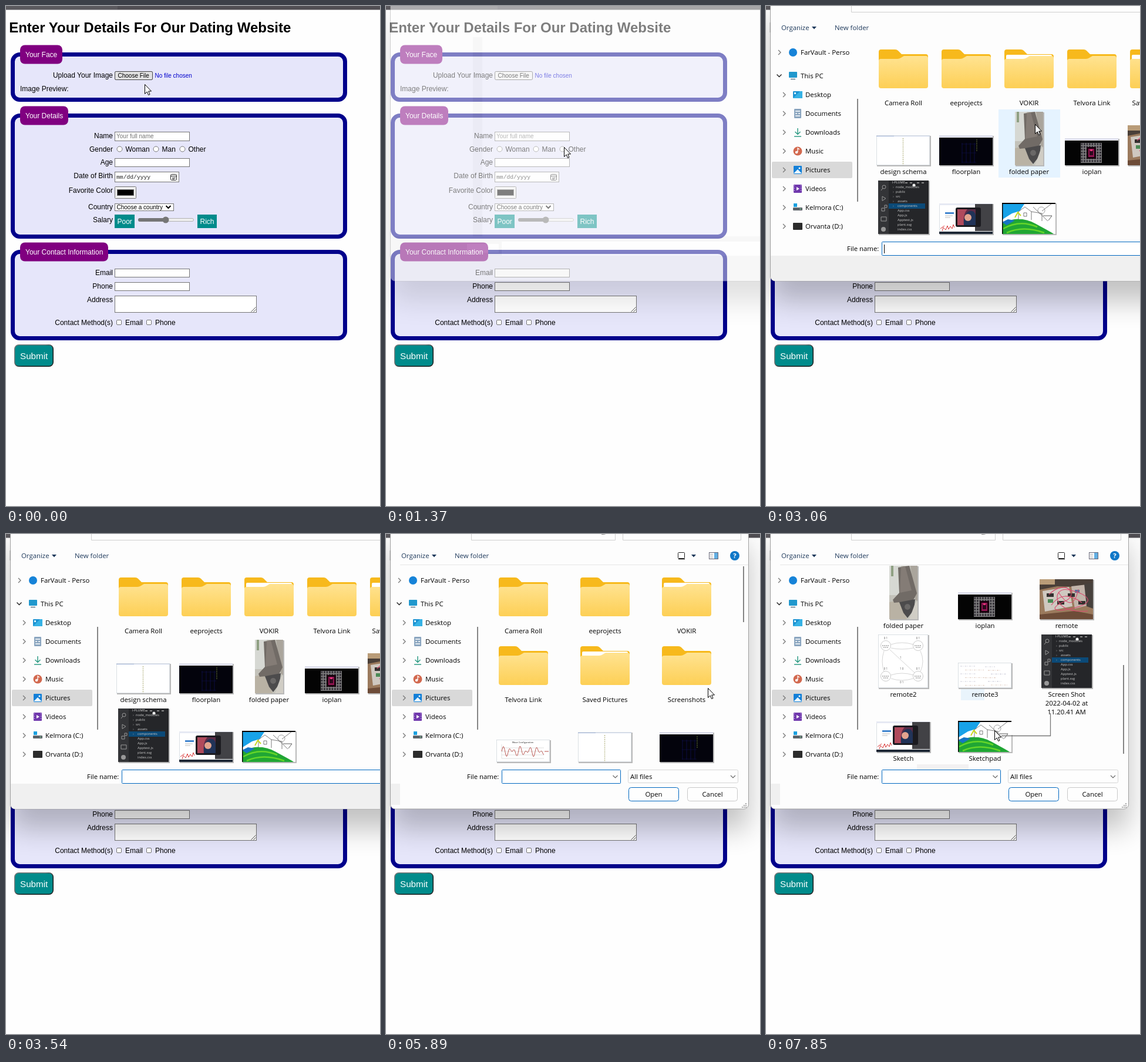
Animation of 637 by 851 pixels, one loop 7.99 s. Source, as an HTML page:

```html
<!DOCTYPE html>
<html lang="en">
<head>
<meta charset="utf-8">
<title>Form and file picker</title>
<style>
html, body { margin: 0; width: 100%; height: 100%; overflow: hidden; background: #fefefe; }
svg { display: block; }
text { font-family: "Liberation Sans", Arial, sans-serif; white-space: pre; }
.ui text { font-family: "Open Sans", "Noto Sans", sans-serif; }
.mono { font-family: "Liberation Mono", monospace !important; }
</style>
</head>
<body>
<svg id="stage" width="637" height="851" viewBox="0 0 637 851"></svg>
<script>
const LOOP = 7990;
const NAVY = '#00008b', TEAL = '#008b8b', GREY = '#767676', BLUE = '#0067c0';

// Drawing helpers
const rect = (x, y, w, h, fill, extra = '') =>
  `<rect x="${x}" y="${y}" width="${w}" height="${h}" fill="${fill}" ${extra}/>`;
const box = (x, y, w, h, fill, stroke = GREY, r = 0) =>
  rect(x + .5, y + .5, w - 1, h - 1, fill, `stroke="${stroke}" rx="${r}"`);
const text = (x, y, s, size = 12, fill = '#000', extra = '') =>
  `<text x="${x}" y="${y}" font-size="${size}" fill="${fill}" ${extra}>${s}</text>`;
const ui = (x, y, s, extra = '', fill = '#000') => text(x, y, s, 11.4, fill, extra);
const fill = (d, color, extra = '') => `<path d="${d}" fill="${color}" ${extra}/>`;
const line = (d, color, w = 1, extra = '') =>
  `<path d="${d}" fill="none" stroke="${color}" stroke-width="${w}" ${extra}/>`;
const circle = (x, y, r, color, stroke = 'none', w = 1) =>
  `<circle cx="${x}" cy="${y}" r="${r}" fill="${color}" stroke="${stroke}" stroke-width="${w}"/>`;
const group = (id, body, extra = '') => `<g id="${id}" ${extra}>${body}</g>`;
const repeat = (n, f) => Array.from({ length: n }, (_, i) => f(i)).join('');
const END = 'text-anchor="end"', MID = 'text-anchor="middle"';

// Web form
const section = (y, h, title, w) =>
  rect(11.5, y + 3.5, 566, h - 7, '#e6e6fa', `stroke="${NAVY}" stroke-width="7" rx="12"`) +
  rect(24, y - 12.5, w, 32, '#800080', 'rx="8"') + text(33, y + 7.5, title, 12, '#fff');
const label = (y, s) => text(182, y, s, 12, '#000', END);
const input = (y, h = 16, w = 128) => box(185, y, w, h, '#fff');
const radio = (x, s) => circle(x, 243.5, 4.5, '#fff', GREY) + text(x + 10, 248, s);
const check = (x, s) => box(x, 534, 9, 9, '#fff', GREY, 1.5) + text(x + 15, 543, s);
const tag = (x, w, s) => rect(x, 355, w, 23, TEAL) + text(x + 4.5, 371, s, 12, '#fff');

const form = [
  rect(0, 0, 637, 851, '#fefefe'),
  rect(0, 0, 637, 6, '#504e53'), rect(0, 0, 190, 6, '#5b595e'), rect(0, 6, 637, 1, '#a8a7aa'),
  text(5.2, 45, 'Enter Your Details For Our Dating Website', 24, '#000', 'font-weight="bold"'),
  section(79, 84, 'Your Face', 72),
  label(122, 'Upload Your Image'),
  box(185, 111, 65, 15, '#efefef', '#555', 2),
  text(190.5, 122, 'Choose File', 10), text(253.5, 122, 'No file chosen', 10, '#0000cd'),
  text(24, 145, 'Image Preview:'),
  section(183, 213, 'Your Details', 82),
  label(225, 'Name'), input(214), text(188, 225, 'Your full name', 10, '#757575'),
  label(248, 'Gender'), radio(193.5, 'Woman'), radio(255.5, 'Man'), radio(300.5, 'Other'),
  label(270, 'Age'), input(259, 15),
  label(293, 'Date of Birth'), input(282, 18, 110),
  text(188, 294, 'mm/dd/yyyy', 9.7, '#222', 'class="mono"'),
  box(280, 286, 11, 11, '#fff', '#222', 2), line('M280 289.5h11M283 292.5h6M283 294.5h4', '#222'),
  label(318, 'Favorite Color'), box(185, 307, 37, 21, '#efefef', GREY, 1), box(189, 312, 29, 11, '#000'),
  label(346, 'Country'), input(336, 13, 101), text(188.5, 346, 'Choose a country', 10),
  line('M272.500 340l4 4 4-4', '#000', 2),
  label(368, 'Salary'), tag(185, 34, 'Poor'), tag(326, 33, 'Rich'),
  rect(225.5, 361.5, 94, 5, '#efefef', 'stroke="#b2b2b2" rx="2.5"'),
  rect(225, 361, 47, 6, GREY, 'rx="3"'), circle(272, 364, 5.5, GREY),
  section(415, 154, 'Your Contact Information', 150),
  label(458, 'Email'), input(447, 15), label(481, 'Phone'), input(470, 15),
  label(504, 'Address'), input(493, 29, 242), line('M417.500 520.500l8-8M421.500 520.500l4-4', '#555'),
  label(543, 'Contact Method(s)'), check(188, 'Email'), check(239, 'Phone'),
  rect(14.75, 576.75, 65.5, 36.5, TEAL, 'stroke="url(#edge)" stroke-width="1.500" rx="7"'),
  text(24, 601, 'Submit', 15.2, '#fff')
].join('');

// Thumbnails, each drawn from its own top left corner
const folder = papers =>
  fill('M0 4q0-4 4-4h24q3 0 5 2l6 6h41q4 0 4 4v20H0Z', '#f7b91c') +
  (papers ? rect(3, 9, 78, 10, '#fff', 'rx="2"') : '') +
  fill('M0 19q0-3 4-3h28q3 0 6-2l5-3h37q4 0 4 4v47q0 4-4 4H4q-4 0-4-4Z', 'url(#gold)');
const sheet = (w, h, color = '#fff') => rect(0, 0, w, h, color, 'stroke="#cfd6dc" stroke-width="1.500"');
const caption = w => rect(0, 0, w, 4, '#f4f4f8') + rect(0, 1, w, 1, '#b9bdd8');

const art = {
  schema: sheet(91, 51) + line('M0 1.500h91', '#ccd6ea') + line('M0 1.500h30', '#9fb2d8') +
    line('M45.500 5v46', '#c2c29a', 1.6, 'stroke-dasharray="2 1.500"'),
  floor: rect(0, 0, 91, 51, '#03030c') + caption(91) + repeat(4, i => line(`M${39 + 7 * i} 13v34`, '#111150', .8)) +
    line('M38 15h25M38 30h25M38 46h25', '#0e0e40', .7) + line('M64 7v20', '#6c7c34', 1, 'stroke-dasharray="2 1"'),
  paper: rect(0, 0, 48, 91, '#c3c2ba') + rect(0, 0, 20, 50, '#d6d8d3') + rect(3, 0, 4, 18, '#8fa083') +
    fill('M0 62L18 58 30 91H0Z', '#b9b2a4') + fill('M36 0H48V60L44 58Z', '#aaa59c') +
    fill('M15 3L34 0 47 47 40 60 8 63 6 58 17 46Z', '#716b66') + fill('M20 2L27 1 38 42 18 46Z', '#847c76') +
    fill('M17 62L44 57 42 75 31 89 24 80Z', '#4c4b4c') + circle(31, 70, 5, '#6a6867') + fill('M44 64L48 60V91H34Z', '#d0cdc5'),
  io: rect(0, 0, 91, 46, '#040404') + caption(91) + rect(27, 8, 36, 34, '#807f80') +
    repeat(56, i => rect(27.5 + i % 8 * 4.5, 8.5 + (i / 8 | 0) * 4.8, 2.8, 3.2, '#302d34')) +
    rect(37, 15, 16, 20, '#16000c') + rect(40, 18, 10, 14, '#8f1450') + rect(42, 21, 6, 8, '#2b0a1c') + rect(43, 19, 4, 3, '#e03478'),
  board: rect(0, 0, 91, 68, '#9b7a5d') + fill('M0 0H91V14L30 12 0 18Z', '#4a3f38') + fill('M0 0H26V9H0Z', '#b99c78') +
    fill('M5 20L50 13 56 46 9 55Z', '#cfc8c0') + fill('M54 12L80 9 84 44 60 50Z', '#c2b4aa') +
    fill('M76 8L91 6V50L80 46Z', '#47413d') + repeat(4, i => rect(12 + 18 * i, 24 + i % 2 * 13, 12, 6, '#33302f')) +
    rect(14, 34, 9, 6, '#4b8a55') + rect(60, 18, 8, 5, '#56719c') + fill('M0 60L60 54 91 60V68H0Z', '#6d4c38') +
    line('M16 26C44-2 70 26 42 38S24 58 62 48 78 24 49 18 19 60 82 54M32 22Q57 60 66 17M20 44Q40 16 72 40', '#d94a6e', 1.1),
  wave: sheet(91, 38) + line('M9 8v24h72M9 20h72M9 14h72M9 26h72', '#ccc', .6) +
    line('M9 20' + repeat(73, i => `L${9 + i} ${(20 - 9 * Math.sin(i * .55) * Math.sin(i * .13 + .8)).toFixed(1)}`), '#b64a45', .9) +
    text(45, 6, 'Wave Configuration', 4, '#222', MID) + line('M82 20h7', '#b64a45'),
  states: sheet(85, 91) +
    [[13, 19], [68, 19], [13, 71], [68, 71]].map(([x, y]) => circle(x, y, 8.5, '#fff', '#aaa', .6) +
      line(`M${x - 6} ${y}h12M${x - 4} ${y + 3}h8`, '#777', 1.1, 'stroke-dasharray="2 1"') +
      text(x, y - 11, '0 1', 4.5, '#555', MID)).join('') +
    line('M22 17Q40 11 60 17M22 23Q40 27 60 23M22 69Q40 63 60 69M22 75Q40 81 60 75M10 28Q4 46 10 63M72 28Q80 46 72 63M20 26L62 65', '#aaa', .5) +
    text(37, 41, '1', 4.5, '#555') + text(37, 60, '1 0', 4.5, '#555') + text(37, 83, '0 1', 4.5, '#555'),
  sums: sheet(91, 43) + repeat(6, i => line(`M${4 + i % 2 * 8} ${6 + i * 6.5}h${25 + i * 7 % 13}M${46 + i % 3 * 5} ${7 + i * 6.2}h${17 + i * 5 % 14}`,
    i % 2 ? '#e3d0c4' : '#cfcfdc', 1.2, 'stroke-dasharray="3 1.500 1 2"')),
  editor: rect(0, 0, 86, 91, '#252629') + rect(0, 0, 18, 91, '#333437') + rect(18, 39, 62, 9, '#0b4a78') +
    text(24, 5, 'I-PLUME...', 5.5, '#ddd') + circle(61, 8, 2.5, '#eee') +
    line('M46 4h4M54 4h4M66 4h4M74 4h4', '#888', 2) +
    ['node_modules', 'public', 'src', 'assets', 'components', 'App.css', 'App.js', 'Apptest.js', 'plant.svg', 'index.css']
      .map((s, i) => text(i < 3 ? 30 : 33, 12.5 + i * 8.1, s, 5.8, '#ccc') + (i < 5 ? text(25, 12.5 + i * 8.1, '›', 6, '#aaa') : '')).join('') +
    circle(10, 11, 3, 'none', '#999') + line('M8 13l-3 4', '#999') + line('M7 27l6 3.500-6 4Z', '#999') +
    line('M6 47h5v5H6zM11 42h4v4h-4z', '#999') + line('M5 62h9v7H5z', '#999') + circle(9, 83, 4, '#999'),
  tablet: sheet(91, 52) + rect(0, 0, 91, 3, '#e6e9f3') + rect(61, 1, 30, 46, '#424246') + rect(0, 48, 91, 4, '#1d2735') +
    rect(28, 7, 43, 33, '#1b1b20', 'rx="3"') + rect(31, 10, 31, 27, '#5b2c47') + fill('M31 10H48Q40 18 42 37H31Z', '#b04a5c') +
    fill('M42 37C40 8 62 8 62 22V37Z', '#213358') + circle(49, 24, 6, '#e3a48e') +
    rect(10, 15, 15, 3, '#4285ce') + line('M10 21h13M10 24h9', '#bbb') +
    line('M2 43l7-5M5 47l2-6 4 4 3-7 2 6 3-5 3 4 2-7 2 5', '#d83535'),
  pad: rect(0, 0, 91, 53, '#fff') + fill('M1 2H38L30 14 17 18 1 28Z', '#18a2e8') +
    fill('M0 35Q28 20 56 35T88 53H0Z', '#20a634') + fill('M0 33L10 28 22 30 8 38Z', '#1675c4') +
    line('M2 44Q30 28 60 41M8 51Q36 38 72 51', '#65d629', 2.5) +
    fill('M28 28V15L39 7 50 15V29L38 27Z', '#fff') +
    line('M28 28V15L39 7 50 15V29M50 15L68 18V31M53 7l25 24M68 14L85 1M37 17h5v6h-5z', '#444', .7) +
    circle(67, 13, 6, 'none', '#777', .7) + line('M70 22h15l-6 8', '#333', .8) + line('M22 25l5-9 5 6', '#c9d920', 2),
};
art.pad += rect(0, 0, 91, 2, '#000') + rect(0, 0, 1.5, 53, '#000');

const items = [
  ['Camera Roll', 84, 80, folder()], ['eeprojects', 84, 80, folder()], ['VOKIR', 84, 80, folder(true)],
  ['Telvora Link', 84, 80, folder()], ['Saved Pictures', 84, 80, folder(true)], ['Screenshots', 84, 80, folder()],
  ['blk2n3', 91, 38, art.wave], ['design schema', 91, 51, art.schema], ['floorplan', 91, 51, art.floor],
  ['folded paper', 48, 91, art.paper], ['ioplan', 91, 46, art.io], ['remote', 91, 68, art.board],
  ['remote2', 85, 91, art.states], ['remote3', 91, 43, art.sums],
  ['Screen Shot|2022-04-02 at|11.20.41 AM', 86, 91, art.editor], ['Sketch', 91, 52, art.tablet], ['Sketchpad', 91, 53, art.pad]
];

const grid = (columns, pitch) => items.map(([name, w, h, body], i) => {
  const x = 233.5 + i % columns * pitch, row = i / columns | 0;
  const y = 169 + row * 117 - (row === 5 ? 8 : 0);
  const left = Math.round(x - w / 2), top = y - 15 - h;
  return (i > 5 ? rect(left + 1, top + 1, w + 1, h + 1, '#b9b9b9') : '') +
    `<svg x="${left}" y="${top}" width="${w}" height="${h}">${body}</svg>` +
    name.split('|').map((s, n) => ui(x + .5, y + n * 15, s, MID)).join('');
}).join('');

// File picker
const windowBase = y => `M8 ${y}H637V468H16a8 8 0 0 1-8-8Z`;
const shadow = w => rect(8, 20, w, 482, '#000', 'opacity=".24" filter="url(#soft)"');
const pane = w => rect(7.5, -20, w + 1, 488, '#fdfdfd', 'rx="8" stroke="#999" stroke-width=".900"');
const chevron = (x, y) => line(`M${x - 2} ${y - 4}l4 4-4 4`, '#777', 1.3);

const icons = [
  y => rect(46, y - 6, 16, 12, '#1c93d2', 'rx="1"') + fill(`M46 ${y + 6}l12-12h4v12Z`, '#36b2e5') + rect(48, y - 4, 3, 3, '#d8f3ff'),
  y => rect(48, y - 8, 12, 16, '#8aa5bf', 'rx="1"') + line(`M50 ${y - 4}h8M50 ${y}h3M55 ${y}h3M50 ${y + 4}h8`, '#fff', 1.5),
  y => line(`M54 ${y - 7}v10M49.500 ${y - 1}l4.500 4.500 4.500-4.500M48 ${y + 7}h12`, '#2f9c85', 1.5),
  y => circle(54, y, 7.5, '#d2694f') + circle(52, y + 2, 2.2, '#fff') + line(`M54 ${y + 2}v-7l3 2`, '#fff', 1.3),
  y => rect(47, y - 7, 14, 14, '#1480d8', 'rx="1"') + fill(`M47 ${y + 6}l7-7 7 7Z`, '#e9f7ff') + circle(57, y - 3, 1.5, '#fff'),
  y => rect(47, y - 7, 14, 14, '#7038ad', 'rx="1"') + fill(`M52 ${y - 3}v6l5-3Z`, '#fff') + line(`M48.500 ${y - 6}v12M59.500 ${y - 6}v12`, '#bda1df', 1, 'stroke-dasharray="2"'),
  y => rect(46, y, 16, 5, '#5b6168', 'rx="1"') + rect(47, y - 7, 6, 6, '#19a0df') + rect(57, y + 2, 3, 1, '#7ee39a'),
  y => rect(46, y - 6, 16, 12, '#2c2c2c', 'rx="1"')
];
const places = ['Desktop', 'Documents', 'Downloads', 'Music', 'Pictures', 'Videos', 'Kelmora (C:)', 'Orvanta (D:)'];

const sidebar = [
  ui(26, 41, 'Organize', '', '#1e395b'), fill('M78 35h8l-4 4.500Z', '#1e395b'), ui(117, 41, 'New folder', '', '#1e395b'),
  rect(10, 265, 137, 28, '#d9d9d9', 'rx="2"'),
  chevron(23, 79), circle(46, 79, 7, '#1683d8'), ui(59, 83, 'FarVault - Perso'),
  line('M18.500 116.500l4 4 4-4', '#222', 1.4), rect(39, 112, 14, 10, '#2198cd', 'rx="1"'),
  line('M42 124.500h8', '#60798b', 1.5), ui(59, 123, 'This PC'),
  places.map((s, i) => chevron(31, 151 + i * 32) + icons[i](151 + i * 32) + ui(67, 155 + i * 32, s)).join(''),
  ui(138, 417, 'File name:')
].join('');

const blank = shadow(700) + pane(700) + rect(148, 53, 16, 339, '#f0f0f0') + fill(windowBase(392), '#f0f0f0') +
  rect(138, 405, 54, 15, '#fff') + rect(197, 401, 440, 24, '#fff');

const wide = shadow(700) + pane(700) + fill(windowBase(425), '#f0f0f0') + line('M145.500 0V10.500H637', '#d0d0d0') +
  box(197, 401, 450, 24, '#fff', BLUE, 1) +
  `<g clip-path="url(#list)">${group('wideHover', rect(0, 176, 105, 116, '#e5f3ff'))}${grid(7, 107)}</g>`;

const button = (x, s, stroke) => box(x, 431, 86, 24, '#fefefe', stroke, 4) + ui(x + 43, 447, s, MID);
const arrows = 'M386.500 411l4 4 4-4M587 411l4 4 4-4';
const gripDots = [0, 1, 2].map(r => repeat(r + 1, i => rect(612 - i * 3, 458 + r * 3, 2, 2, '#aaa'))).join('');
const thumb = (id, y, h) => group(id, rect(608, y, 2, h, '#858585'));
const narrow = [
  shadow(609), pane(609), rect(8, 425, 16, 36, '#f0f0f0'),
  line('M145.500 0V10.500H390.500V0M403.500 0V10.500H604.500V0', '#d0d0d0'), line('M367 0q4 1 8-1', '#888', 1.5),
  line('M24 52.500H617', '#e6e6e6'),
  box(497, 31, 12, 11, '#fff', '#222', 1), line('M498 42.500h11', '#222', 1.5), fill('M520 35h8l-4 4.500Z', '#1e395b'),
  box(550, 31, 16, 12, '#fff', '#667'), rect(559, 32, 6, 10, '#62aee2'), line('M552 34.500h5M552 37.500h5M552 40.500h5', '#aaa'),
  circle(594, 37, 8, '#0f78c8'), ui(594, 41, '?', MID + ' font-weight="bold"', '#fff'),
  box(197, 401, 203, 24, '#fff', BLUE, 1), box(412, 401, 188, 23, '#fefefe', '#d5d5d5', 2), ui(416, 417, 'All files'),
  line(arrows, '#666', 1.1), button(413, 'Open', BLUE), button(513, 'Cancel', '#c8c8c8'), gripDots,
  '<g clip-path="url(#list)">',
  group('narrowHover', rect(0, 0, 105, 116, '#e5f3ff')),
  group('leftover', rect(332, 233, 40, 50, '#e9f4fc')),
  group('files', grid(3, 139)),
  group('tooltip', rect(418, 308, 66, 34, '#fdfdfd') + line('M484.500 305V343.500H401', '#777', 1.3)),
  '</g>',
  group('strip', rect(257, 392, 88, 9, '#f3f1f2')),
  thumb('thumbTop', 55, 95), thumb('thumbMid', 189, 133), thumb('thumbEnd', 223, 151)
].join('');

document.getElementById('stage').innerHTML = `<defs>
  <filter id="soft" x="-20%" y="-20%" width="140%" height="140%"><feGaussianBlur stdDeviation="24"/></filter>
  <linearGradient id="gold" x2="0" y2="1"><stop stop-color="#ffe391"/><stop offset="1" stop-color="#fdcf55"/></linearGradient>
  <linearGradient id="edge" y2="1"><stop offset=".4" stop-color="#767676"/><stop offset=".6" stop-color="#1a1a1a"/></linearGradient>
  <clipPath id="list"><rect x="165" y="54" width="472" height="337"/></clipPath></defs>` +
  form + group('hoverButton', box(185, 111, 65, 15, '#e2e2e2', '#444', 2) + text(190.5, 122, 'Choose File', 10)) +
  group('blank', blank) +
  group('wide', wide, 'class="ui"') + group('narrow', narrow, 'class="ui"') + group('sidebar', sidebar, 'class="ui"') +
  group('sideThumb', rect(155, 158, 2, 175, '#858585')) + group('caret', rect(201, 406, 1, 15, '#000')) +
  group('cursor', fill('M.5.5V16.500L4.200 13 6.600 18.500 9 17.500 6.700 12H11.500Z', '#fff', 'stroke="#000"'));

// Motion: every row is [time, value], held until the next row
const play = (id, prop, rows) => {
  const frames = rows.map(([t, v]) => ({ offset: t / LOOP, [prop]: v, easing: 'step-end' }));
  frames.push({ offset: 1, [prop]: rows.at(-1)[1] });
  document.getElementById(id).animate(frames, { duration: LOOP, iterations: Infinity });
};
const toggle = (id, ...times) => play(id, 'opacity', [[0, 0], ...times.map((t, i) => [t, (i + 1) % 2])]);
const move = (id, rows) => play(id, 'transform', rows.map(([t, x, y]) => [t, `translate(${x}px,${y}px)`]));

play('hoverButton', 'opacity', [[0, 1], [140, 0]]);
play('blank', 'opacity', [[0, 0], [1370, .5], [1510, 1], [2330, 0]]);
toggle('wide', 2330, 5620);
toggle('narrow', 5620);
toggle('sidebar', 2330);
toggle('sideThumb', 1930);
toggle('caret', 2790, 3300, 3820, 4380, 4950, 5470, 6040, 6550, 7040, 7560);
toggle('wideHover', 3060, 3540);
move('wideHover', [[0, 396, 0], [3300, 503, 0]]);
toggle('narrowHover', 6040, 6400, 6920, 7720);
move('narrowHover', [[0, 460, 176], [6920, 320, 128], [7190, 320, 167]]);
move('files', [[0, 0, 0], [6550, 0, -282], [7190, 0, -360]]);
toggle('leftover', 7720);
toggle('tooltip', 7720);
toggle('strip', 7190);
toggle('thumbTop', 5620, 6550);
toggle('thumbMid', 6550, 7190);
toggle('thumbEnd', 7190);
move('cursor', [
  [0, 236, 133], [140, 260, 187], [300, 282, 220], [430, 302, 244], [560, 316, 258],
  [860, 319, 256], [980, 310, 247], [1100, 298, 237], [1250, 303, 240],
  [1930, 289, 229], [2180, 289, 221], [2910, 301, 214],
  [3060, 458, 201], [3180, 488, 207], [3300, 530, 220], [3420, 585, 235], [3540, -60, -60],
  [5350, 619, 488], [5470, 610, 460], [5620, 548, 262], [6040, 535, 242], [6160, 510, 224], [6280, 476, 209],
  [6400, 450, 201], [6550, 445, 199], [6800, 425, 208], [6920, 395, 219], [7040, 365, 230],
  [7190, 360, 233], [7720, 378, 290], [7850, 389, 334]
]);
</script>
</body>
</html>
```
